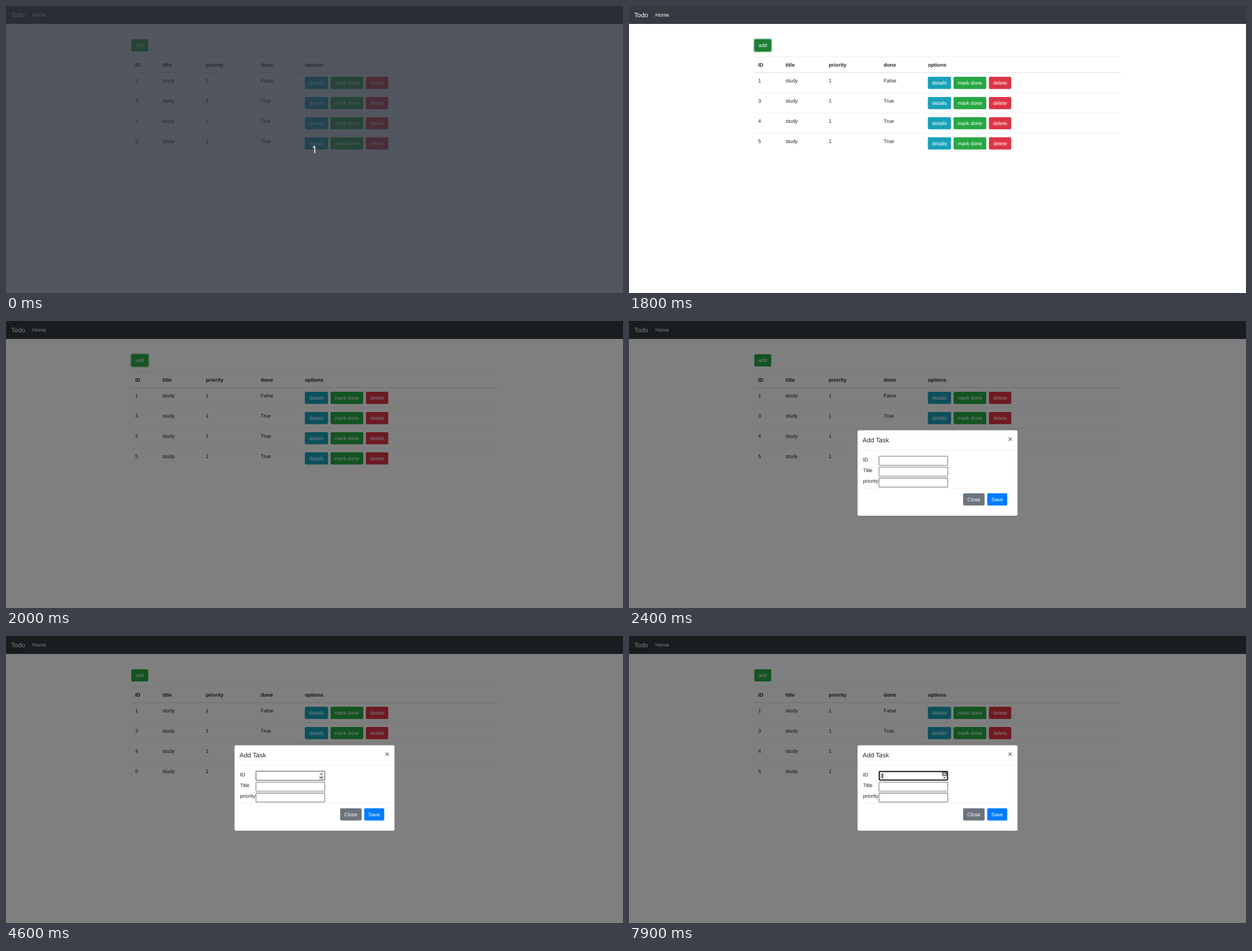
Recreate the animation shown at these times as an HTML page with a canvas. Size 1095 by 511 pixels, loop 8 s.

```html
<!DOCTYPE html>
<html lang="en">
<head>
<meta charset="utf-8">
<title>Todo</title>
<style>
  html, body { margin: 0; width: 100%; height: 100%; overflow: hidden; background: #fff; }
  canvas { position: absolute; left: 0; top: 0; }
</style>
</head>
<body>
<canvas id="page" width="1095" height="511"></canvas>
<canvas id="modal" width="1095" height="511"></canvas>
<script>
// Layout is in page units (1920 wide), scaled down to the stage.
const SCALE = 1095 / 1920, W = 1920, H = 897, LOOP = 8000, STEP = 100;
const INK = '#212529', LINE = '#dee2e6';
const GREEN = '#28a745', TEAL = '#17a2b8', RED = '#dc3545';
const FIELD = { x: 777, y: 421.4, w: 216, h: 30, pitch: 34 };

const pageCtx = document.getElementById('page').getContext('2d');
const modalCanvas = document.getElementById('modal');
const modalCtx = modalCanvas.getContext('2d');
let ctx = pageCtx;

const ramp = (t, from, to) => Math.min(1, Math.max(0, (t - from) / (to - from)));
const latest = (list, t) => list.filter(item => item[0] <= t).pop();

function begin(target) {
  ctx = target;
  ctx.setTransform(SCALE, 0, 0, SCALE, 0, 0);
  ctx.clearRect(0, 0, W, H);
  ctx.textRendering = 'geometricPrecision';
}

function rect(x, y, w, h, color) {
  ctx.fillStyle = color;
  ctx.fillRect(x, y, w, h);
}

function rounded(x, y, w, h, r, color) {
  ctx.fillStyle = color;
  ctx.beginPath();
  ctx.roundRect(x, y, w, h, r);
  ctx.fill();
}

function outline(x, y, w, h, r, color, width) {
  ctx.strokeStyle = color;
  ctx.lineWidth = width;
  ctx.beginPath();
  ctx.roundRect(x + width / 2, y + width / 2, w - width, h - width, r);
  ctx.stroke();
}

// Text whose line box is centred on y.
function text(str, x, y, { size = 16, bold = false, color = INK, align = 'left' } = {}) {
  ctx.font = `${bold ? 'bold ' : ''}${size}px "Liberation Sans", Arial, sans-serif`;
  ctx.fillStyle = color;
  ctx.textAlign = align;
  ctx.fillText(str, x, y + size * 0.3465);
}

function button(label, x, y, w, color) {
  rounded(x, y, w, 38, 4, color);
  text(label, x + w / 2, y + 19, { color: '#fff', align: 'center' });
}

function addButton(t) {
  const dark = 0.8 * ramp(t, 1190, 1340) + 0.2 * ramp(t, 1660, 1800) - ramp(t, 1900, 2000);
  const ring = ramp(t, 1660, 1800) - ramp(t, 2300, 2400);
  if (ring > 0) {
    rounded(386.8, 100.8, 59.1, 44.4, 7, `rgba(72,180,97,${ring / 2})`);
  }
  button('add', 390, 104, 52.7, `rgb(${40 - 10 * dark},${167 - 41 * dark},${69 - 17 * dark})`);
}

function drawPage(t) {
  begin(pageCtx);
  rect(0, 0, W, H, '#fff');
  rect(0, 0, W, 56, '#343a40');
  text('Todo', 16, 28, { size: 20, color: '#fff' });
  text('Home', 82, 28, { color: '#fff' });
  addButton(t);

  const columns = [402, 487, 621.5, 792.5, 930];
  rect(390, 158, 1140, 1, LINE);
  ['ID', 'title', 'priority', 'done', 'options'].forEach((name, i) =>
    text(name, columns[i], 183, { bold: true }));
  rect(390, 207, 1140, 2, LINE);

  [1, 3, 4, 5].forEach((id, row) => {
    const top = 209 + row * 63;
    if (row) rect(390, top - 1, 1140, 1, LINE);
    [id, 'study', 1, row ? 'True' : 'False'].forEach((cell, i) =>
      text(String(cell), columns[i], top + 24));
    button('details', 930, top + 12, 72.2, TEAL);
    button('mark done', 1010, top + 12, 101.8, GREEN);
    button('delete', 1120, top + 12, 69.5, RED);
  });

  if (t < 100) drawCountdown();
  const shade = 0.5 * ramp(t, 1835, 1985);
  if (shade) rect(0, 0, W, H, `rgba(0,0,0,${shade})`);
}

function drawCountdown() {
  rect(0, 0, W, H, 'rgba(37,42,52,0.793)');
  ctx.font = '32px "Noto Sans", sans-serif';
  ctx.textAlign = 'center';
  ctx.fillStyle = '#fff';
  ctx.fillText('1', W / 2, 460);
}

// Pointer position: start time, hovered field, hovered spinner half.
const HOVERS = [
  [0, -1], [3000, 0], [3100, -1], [3200, 1], [3300, 2], [3600, 1], [3900, 0],
  [4000, 0, 'down'], [4100, 0, 'up'], [4200, -1], [4600, 0, 'down'], [5900, 0, 'up']
];
const VALUES = [[0, ''], [6400, '1'], [6800, '2'], [7900, '3']];

function spinner(y, half, pressed) {
  ['up', 'down'].forEach((name, i) => {
    const active = half === name, down = active && pressed;
    const top = y + 3.2 + i * 12, mid = top + 6, dir = i ? 1 : -1;
    rect(974, top, 15, 12, down ? '#787878' : active ? '#cecece' : '#f1f1f1');
    ctx.fillStyle = down ? '#fff' : '#404040';
    ctx.beginPath();
    ctx.moveTo(977.5, mid - 2 * dir);
    ctx.lineTo(985.5, mid - 2 * dir);
    ctx.lineTo(981.5, mid + 2.5 * dir);
    ctx.fill();
  });
}

function field(label, index, t) {
  const { x, w, h } = FIELD, y = FIELD.y + index * FIELD.pitch;
  const [, hovered, half] = latest(HOVERS, t);
  const focused = index === 0 && t >= 6400;
  text(label, 728, y + 10.8);
  rounded(x, y, w, h, 2, '#fff');
  if (hovered === index && index !== 1) {
    spinner(y, half, (t >= 6400 && t < 6900) || t >= 7900);
  }
  if (focused) {
    text(latest(VALUES, t)[1], x + 4, y + h / 2, { color: '#000' });
    if (t < 7200 || t >= 7900) rect(789.6, y + 6.5, 1.4, 18, '#000');
    outline(x, y, w, h, 2, '#101010', 3.4);
  } else {
    outline(x, y, w, h, 1.5, hovered === index ? '#454545' : '#707070', 1.8);
  }
}

function suggestions() {
  const top = 452, rowHeight = 30;
  rect(777, top, 216, 91, '#fff');
  outline(777, top, 216, 91, 1, '#c8c8c8', 1.4);
  ['3', '4', '5'].forEach((id, i) => text(id, 787, top + rowHeight * (i + 0.5)));
}

function drawModal(t) {
  begin(modalCtx);
  modalCanvas.style.opacity = ramp(t, 2010, 2160);
  if (t < 2010) return;
  const left = 1 - ramp(t, 2010, 2310);
  ctx.translate(0, -50 * left ** 1.7);

  rounded(710, 340, 500, 269, 4.8, 'rgba(0,0,0,0.2)');
  rounded(711, 341, 498, 267, 4, '#fff');
  text('Add Task', 727, 372, { size: 20 });
  text('×', 1186, 369, { size: 24, bold: true, color: '#7f7f7f', align: 'center' });
  rect(711, 403, 498, 1, LINE);
  rect(727, 521, 466, 1, LINE);
  ['ID', 'Title', 'priority'].forEach((label, i) => field(label, i, t));
  button('Close', 1039.7, 538, 66.9, '#6c757d');
  button('Save', 1114.6, 538, 62.4, '#007bff');
  if (t >= 6400 && t < 6800) suggestions();
}

const start = performance.now();
function frame() {
  const elapsed = (performance.now() - start) % LOOP;
  const t = Math.floor(elapsed / STEP) * STEP;
  drawPage(t);
  drawModal(t);
  requestAnimationFrame(frame);
}
frame();
</script>
</body>
</html>
```
